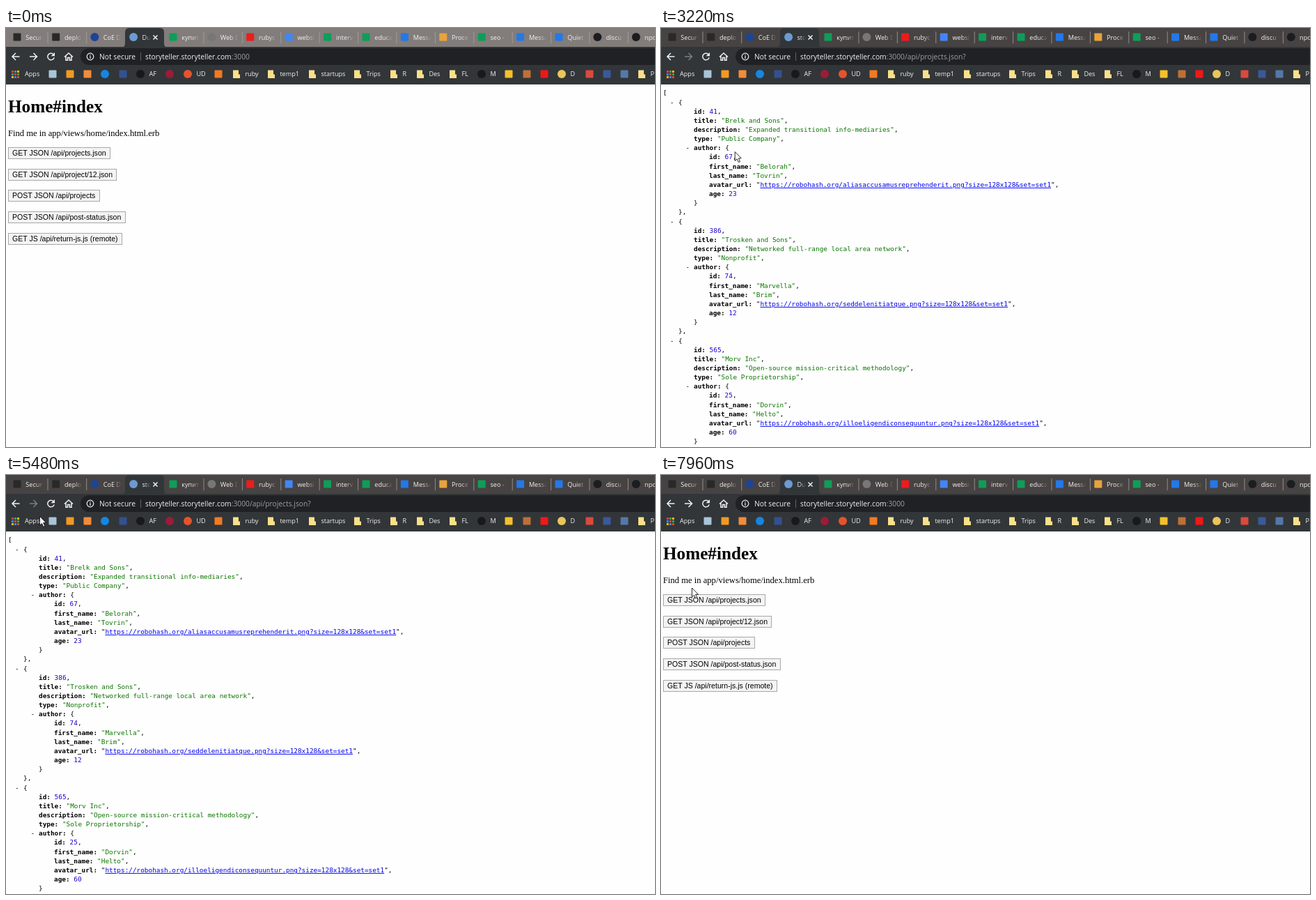
An HTML page for the animation above (8 s loop, 932 px wide and 601 px high).

```html
<!DOCTYPE html>
<html>
<head>
<meta charset="utf-8">
<style>
html, body { margin: 0; width: 100%; height: 100%; overflow: hidden; background: #fefefe; }
svg { display: block; }
text { white-space: pre; }
.ui { font-family: "Open Sans", "Noto Sans", sans-serif; font-size: 9.1px; fill: #f1f1f1; }
.url { font-size: 10.3px; }
.serif { font-family: "Liberation Serif", serif; }
.btn { font: 10.55px "Liberation Sans", sans-serif; }
.mono { font-family: "DejaVu Sans Mono", monospace; font-size: 9.38px; }
.key { font-weight: bold; }
.str { fill: #0b7500; }
.num { fill: #1a01cc; }
.link { fill: #0000ee; text-decoration: underline; }
.mark { fill: #3390ff; display: none; }
.sel .mark { display: inline; }
.sel tspan { fill: #fff; }
.line { fill: none; stroke: #f1f1f1; stroke-width: 1.5; }
.hover { fill: #f1f4fc; stroke: #333; stroke-dasharray: 1 1; }
</style>
</head>
<body>
<svg id="stage" width="932" height="601" viewBox="0 0 932 601">
  <defs>
    <linearGradient id="fade" gradientUnits="userSpaceOnUse" x1="26" x2="38" y1="0" y2="0">
      <stop stop-color="#f1f1f1"/><stop offset="1" stop-color="#f1f1f1" stop-opacity="0"/>
    </linearGradient>
    <linearGradient id="shortFade" gradientUnits="userSpaceOnUse" x1="16" x2="25" y1="0" y2="0">
      <stop stop-color="#f1f1f1"/><stop offset="1" stop-color="#f1f1f1" stop-opacity="0"/>
    </linearGradient>
  </defs>
</svg>
<script>
const stage = document.getElementById('stage');

function add(parent, tag, attrs = {}, text) {
  const e = document.createElementNS('http://www.w3.org/2000/svg', tag);
  for (const k in attrs) e.setAttribute(k, attrs[k]);
  if (text !== undefined) e.textContent = text;
  return parent.appendChild(e);
}
const group = (parent, attrs) => add(parent, 'g', attrs);
const rect = (p, x, y, width, height, fill, more) => add(p, 'rect', {x, y, width, height, fill, ...more});
const disc = (p, cx, cy, r, fill) => add(p, 'circle', {cx, cy, r, fill});
const label = (p, x, y, cls, text, more) => add(p, 'text', {x, y, class: cls, ...more}, text);
const show = (e, on) => e.style.display = on ? '' : 'none';

// A colour starting with "o" gives a disc, any other a square.
function icon(p, x, y, color) {
  if (color[0] === 'o') return disc(p, x, y, 6, color.slice(1));
  return rect(p, x - 5.5, y - 5.5, 11, 11, color, {rx: 1});
}

// Start page
const home = group(stage);
label(home, 3, 121, 'serif', 'Home#index', {'font-size': 25.2, 'font-weight': 'bold'});
label(home, 3, 155, 'serif', 'Find me in app/views/home/index.html.erb', {'font-size': 12.6});
const buttons = [
  ['GET JSON /api/projects.json', 147], ['GET JSON /api/project/12.json', 156],
  ['POST JSON /api/projects', 132], ['POST JSON /api/post-status.json', 169],
  ['GET JS /api/return-js.js (remote)', 164]
].map(([text, w], i) => {
  const y = 171 + Math.round(30.7 * i);
  const box = rect(home, 3.5, y + .5, w - 1, 16, '#f4f4f4');
  label(home, 9, y + 12.2, 'btn', text);
  return {box, y, w};
});

// Unformatted response
const raw = group(stage);
[
  '[{"id":41,"title":"Brelk and Sons","description":"Expanded transitional info-mediaries","type":"Public Company","author":{"id":67,"first_name":"Belorah","last_name":',
  'size=128x128\\u0026set=set1","age":23}},{"id":386,"title":"Trosken and Sons","description":"Networked full-range local area network","type":"Nonprofit","author":',
  '{"id":74,"first_name":"Marvella","last_name":"Brim","avatar_url":"https://robohash.org/seddelenitiatque.png?size=128x128\\u0026set=set1","age":12}},{"id":565,"title":',
  'Proprietorship","author":{"id":25,"first_name":"Dorvin","last_name":"Helto","avatar_url":"https://robohash.org/illoeligendiconsequuntur.png?size=128x128\\u0026set=set1',
  'application","type":"Sole Proprietorship","author":{"id":82,"first_name":"Thornvik","last_name":"Pelva","avatar_url":"https://robohash.org/sapienteetest.png?size=128x128',
  'cohesive hub","type":"Self-Employed","author":{"id":15,"first_name":"Wenna","last_name":"Dush","avatar_url":"https://robohash.org/doloribusnihilvoluptatem.png?size=128'
].forEach((s, i) => label(raw, 3, 97 + 11.85 * i, 'mono', s));

// Formatted response
const json = group(stage), ROW = 13.154, CHAR = 5.645;
const itemHover = rect(json, 23.5, 98.5, 552, 172, '', {class: 'hover'});
const titleHover = rect(json, 45.5, 295.5, 150, 14, '', {class: 'hover'});
const rows = [];

function row(x, ...parts) {
  const y = 96.4 + ROW * rows.length, g = group(json);
  const length = parts.reduce((n, p) => n + p[0].length, 0);
  rect(g, x, y - 10.2, length * CHAR, 12.7, '', {class: 'mark'});
  const t = label(g, x, y, 'mono', '');
  for (const [text, cls = ''] of parts) add(t, 'tspan', {class: cls}, text);
  rows.push(g);
  return y;
}
function field(x, key, value, end = ',') {
  const name = [key, 'key'], colon = [': ', 'key'];
  if (typeof value === 'number') row(x, name, colon, ['' + value, 'num'], [end]);
  else if (key === 'avatar_url') row(x, name, colon, ['"'], [value, 'link'], ['"' + end]);
  else row(x, name, colon, [`"${value}"`, 'str'], [end]);
}
function dash(x, y) { label(json, x, y, 'mono', '-'); }

row(3, ['[']);
[
  [41, 'Brelk and Sons', 'Expanded transitional info-mediaries', 'Public Company',
    67, 'Belorah', 'Tovrin', 'aliasaccusamusreprehenderit', 23],
  [386, 'Trosken and Sons', 'Networked full-range local area network', 'Nonprofit',
    74, 'Marvella', 'Brim', 'seddelenitiatque', 12],
  [565, 'Morv Inc', 'Open-source mission-critical methodology', 'Sole Proprietorship',
    25, 'Dorvin', 'Helto', 'illoeligendiconsequuntur', 60]
].forEach(([id, title, about, type, author, first, last, image, age]) => {
  dash(13, row(25, ['{']));
  field(47, 'id', id);
  field(47, 'title', title);
  field(47, 'description', about);
  field(47, 'type', type);
  dash(35.5, row(47, ['author', 'key'], [': ', 'key'], ['{']));
  field(69, 'id', author);
  field(69, 'first_name', first);
  field(69, 'last_name', last);
  field(69, 'avatar_url', `https://robohash.org/${image}.png?size=128x128&set=set1`);
  field(69, 'age', age, '');
  row(47, ['}']);
  row(25, ['},']);
});

// Tab strip
const bar = group(stage, {class: 'ui'});
const strip = rect(bar, 0, 0, 932, 28, '#827d7b');
add(bar, 'path', {d: 'M165 28Q171 28 171 22V6Q171 0 177 0H221Q227 0 227 6V22Q227 28 233 28Z', fill: '#323639'});
let favicon, tabTitle;
[
  ['Secur', '#292929'], ['deplo', '#292929'], ['CoE D', 'o#1d4594'], ['Dum', 'o#6b9bd1'],
  ['купит', '#0f9d58'], ['Web D', 'o#777777'], ['rubyc', '#ee1c1c'], ['websi', '#4285f4'],
  ['interv', '#0f9d58'], ['educa', '#0f9d58'], ['Messa', '#2478e8'], ['Proce', '#e8a33c'],
  ['seo -', '#0f9d58'], ['Messa', '#2478e8'], ['Quiet', '#2478e8'], ['discu', 'o#1b1d20'],
  ['npoc', 'o#1b1d20']
].forEach(([text, color], i) => {
  const x = i < 4 ? 16 + 55.7 * i : 240 + 55.4 * (i - 4);
  const tab = group(bar, {transform: `translate(${x} 13)`});
  const mark = icon(tab, 0, 0, color);
  const name = label(tab, 12.3, 3.6, '', text, {fill: i === 3 ? 'url(#shortFade)' : 'url(#fade)'});
  if (i === 3) { favicon = mark; tabTitle = name; }
  if (i !== 2 && i !== 3) rect(tab, 43.5, -8, 1, 17, '#aaa6a4', {opacity: .75});
});
add(bar, 'path', {class: 'line', d: 'M211.5 10.5l6 6m0-6l-6 6'});

// Address row
rect(bar, 0, 27, 932, 54, '#323639');
add(bar, 'path', {class: 'line', d: 'M19.5 41H9.5M14 36L9 41L14 46'});
const forward = add(bar, 'path', {class: 'line', d: 'M34 41H44M39.5 36L44.5 41L39.5 46'});
add(bar, 'path', {class: 'line', d: 'M68 37.6A4.8 4.8 0 1 0 69.2 42.4'});
add(bar, 'path', {fill: '#f1f1f1', d: 'M70 35v5.3h-5.3z'});
add(bar, 'path', {class: 'line', d: 'M84 41.5L90 36L96 41.5M86 40.5V46.3H88.6V42.5H91.4V46.3H94V40.5'});
const omnibox = rect(bar, 107, 29, 850, 24, '', {rx: 12});
add(bar, 'circle', {cx: 121, cy: 41, r: 4.8, class: 'line', style: 'stroke-width:1.2'});
rect(bar, 120.4, 40, 1.2, 4, '#f1f1f1');
rect(bar, 120.4, 38, 1.2, 1.2, '#f1f1f1');
label(bar, 134, 44.8, 'url', 'Not secure');
rect(bar, 193, 35, 1, 12, '#5f6368');
const url = label(bar, 200, 44.8, 'url', '');
add(url, 'tspan', {}, 'storyteller.storyteller.com');
const path = add(url, 'tspan', {fill: '#9aa0a6'});

// Bookmarks
for (let i = 0; i < 9; i++)
  rect(bar, 8 + i % 3 * 4, 61 + (i / 3 | 0) * 4, 3, 3, ['#ea4335', '#34a853', '#fbbc05', '#4285f4'][i % 4]);
label(bar, 27, 69.3, '', 'Apps');
const FOLDER = 'folder';
[
  [67, '#a9c5d8'], [92, '#f09a24'], [117, '#f28c38'], [142, 'o#1686e0'], [168, '#35508f'],
  [193, 'o#17191c', 'AF'], [235, 'o#9c1c38'], [261, 'o#e5532d', 'UD'], [305, '#f47a20'],
  [331, FOLDER, 'ruby'], [381, FOLDER, 'temp1'], [440, FOLDER, 'startups'], [505, FOLDER, 'Trips'],
  [557, FOLDER, 'R'], [595, FOLDER, 'Des'], [642, FOLDER, 'FL'], [683, 'o#17191c', 'M'],
  [722, '#f4c02c'], [748, '#bd7038'], [773, '#f01818'], [798, 'o#e9c65a', 'D'], [838, '#d94a3d'],
  [863, '#3b5998'], [888, '#5578a8'], [913, FOLDER, 'P']
].forEach(([x, color, text]) => {
  if (color === FOLDER)
    add(bar, 'path', {fill: '#fbe08a', d: `M${x - 5} 60.5h8v6h2v5.5h-10z`});
  else icon(bar, x, 66, color);
  if (text) label(bar, x + 12.4, 69.3, '', text);
});

// Pointer
const glow = disc(stage, 0, 0, 9, '#ffee22');
glow.style.mixBlendMode = 'multiply';
const pointer = add(stage, 'path', {
  d: 'M.5.5V13.5L3.5 10.7L5.7 15.5L7.8 14.5L5.7 9.8H9.6Z', fill: '#fff', stroke: '#111', 'stroke-width': .9
});

// time, x, y of the pointer tip
const track = [
  [280, 699, 549], [600, 400, 260], [850, 190, 180], [980, 158, 212], [1130, 158, 212],
  [1510, 106, 177.5], [3220, 106, 177.5], [3380, 56, 112], [3470, 56, 112], [3790, 117, 182],
  [3940, 130, 238], [4080, 130, 238], [4300, 150, 296], [4390, 180, 296], [4630, 520, 76],
  [4860, 530, 44], [4930, 530, 44], [5140, 692, 248], [5350, 560, 60], [5470, 27, 60],
  [5640, 351, 40], [6170, 351, 40], [6480, 488, 187], [6560, 488, 187], [6940, 30, 46],
  [7020, 30, 46], [7180, 10, 43], [7420, 10, 43], [7940, 44, 161.5]
];
const presses = [[1680, 1770], [3430, 4080], [5880, 5940], [7180, 7340]];

function tip(t) {
  const i = track.findIndex(k => k[0] > t);
  if (i < 0) return track[track.length - 1].slice(1);
  if (!i) return track[0].slice(1);
  const [t0, x0, y0] = track[i - 1], [t1, x1, y1] = track[i], u = (t - t0) / (t1 - t0);
  return [x0 + (x1 - x0) * u, y0 + (y1 - y0) * u];
}

function draw(t) {
  const [x, y] = tip(t), within = (a, b, c, d) => x >= a && x < c && y >= b && y < d;
  const away = t >= 2460 && t < 7420, loading = t >= 2460 && t < 2990;
  show(home, !away);
  show(raw, away && t < 2760);
  show(json, away && t >= 2760);

  strip.setAttribute('fill', t < 1770 ? '#827d7b' : '#474343');
  favicon.setAttribute('r', loading ? 3 : 6);
  tabTitle.textContent = away ? 'sto' : 'Dum';
  path.textContent = ':3000' + (away ? '/api/projects.json?' : '');
  forward.style.stroke = away ? '#7b7e82' : '';
  omnibox.setAttribute('fill', t > 4900 && within(107, 29, 932, 53) ? '#2b2c2f' : '#202124');

  for (const b of buttons)
    b.box.setAttribute('stroke', t >= 280 && within(3, b.y, 3 + b.w, b.y + 17) ? '#6f6f6f' : '#a8a8a8');

  const dragged = t >= 3470 && t < 4080 ? Math.floor((y - 112) / ROW) : 0;
  rows.forEach((g, i) => g.setAttribute('class', i >= 2 && i < 2 + dragged ? 'sel' : ''));
  show(itemHover, t >= 4080 && !(t > 4280 && t < 4700) && within(23, 98, 576, 271));
  show(titleHover, t > 4280 && t < 4700);

  show(pointer, t >= 280);
  pointer.setAttribute('transform', `translate(${x} ${y})`);
  show(glow, presses.some(([a, b]) => t >= a && t < b));
  glow.setAttribute('transform', `translate(${x + 1} ${y + 2})`);
}

const start = performance.now();
function tick() {
  draw((performance.now() - start) % 8000);
  requestAnimationFrame(tick);
}
tick();
</script>
</body>
</html>
```
